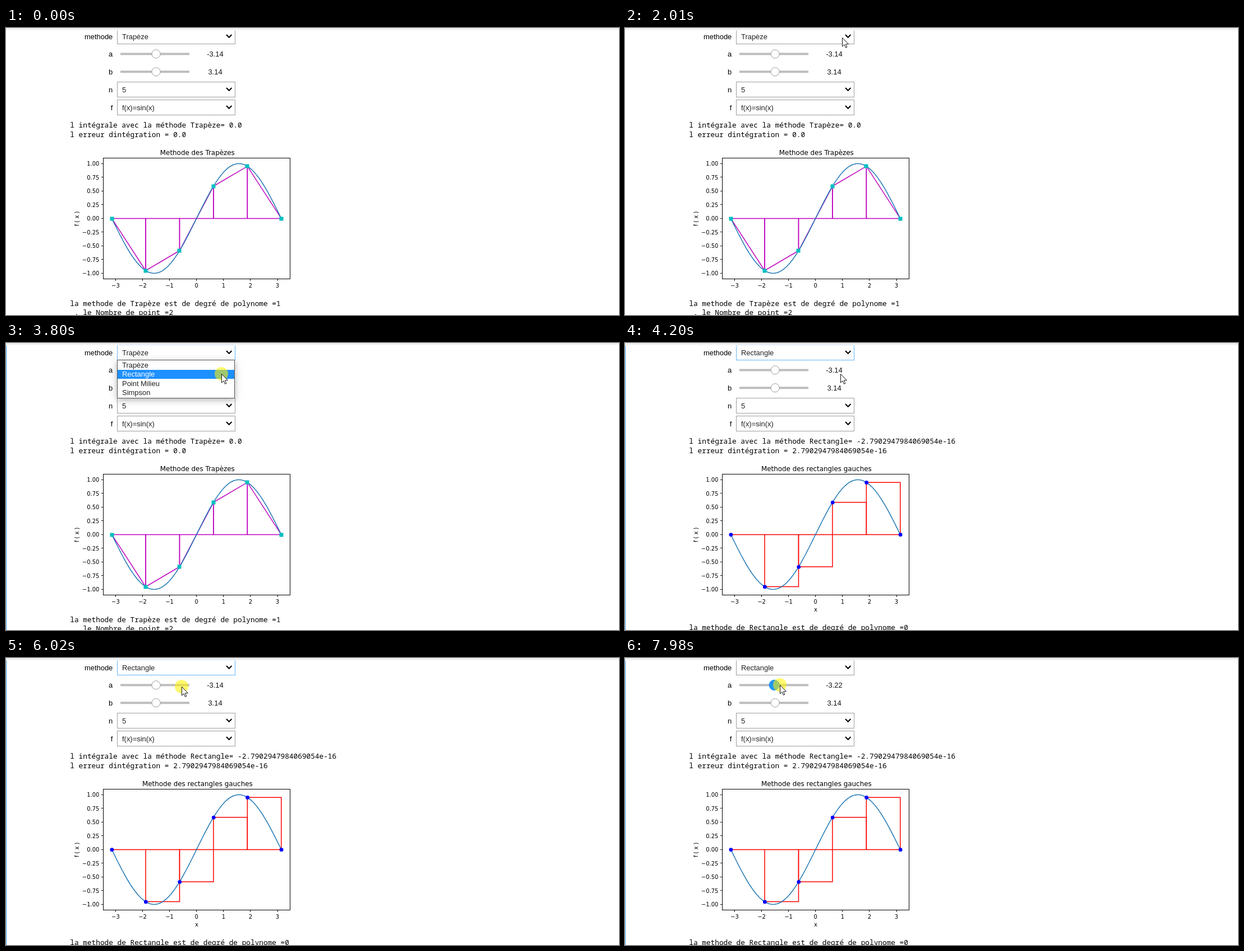
An HTML page with a canvas for the animation above (8 s loop, 1093 by 513 pixels).

```html
<!DOCTYPE html>
<html lang="fr">
<head>
<meta charset="utf-8">
<title>Méthodes d'intégration</title>
<style>
  html, body { margin: 0; width: 100%; height: 100%; overflow: hidden; background: #fff; }
  canvas { display: block; }
</style>
</head>
<body>
<canvas id="stage" width="1093" height="513"></canvas>
<script>
const W = 1093, H = 513, LOOP = 8000;
const ctx = document.getElementById('stage').getContext('2d');

const UI = '12.95px "Liberation Sans", Arial, sans-serif';
const MONO = '12.77px "Noto Sans Mono", monospace';
const PLOT = '9.95px "DejaVu Sans", sans-serif';
const TITLE = '11.92px "DejaVu Sans", sans-serif';
const METHODS = ['Trapèze', 'Rectangle', 'Point Milieu', 'Simpson'];
const NODES = Array.from({ length: 6 }, (_, i) => -Math.PI + i * Math.PI * 2 / 5);

// Pointer path: start, end, steps, target x, target y, vertical bulge
const START = { at: 520, x: 716, y: 396 };
const MOVES = [
  [590, 590, 1, 654, 300, 0],
  [850, 990, 3, 450, 121, 0],
  [1260, 1540, 5, 407, 46, 0],
  [1740, 2010, 5, 387, 17, 0],
  [2750, 3390, 10, 384, 55, 0],
  [4800, 5490, 10, 313, 51, 6],
  [6240, 6580, 5, 310, 50, 0],
  [6920, 7650, 10, 269, 48, -16],
  [7980, 7980, 1, 276, 48, 0]
];
const CLICKS = [[2370, 2480], [3800, 3870], [6020, 6040], [7780, LOOP]];

const within = (t, a, b) => t >= a && t < b;

function pointerAt(t) {
  let { x, y } = START;
  for (const [t0, t1, n, tx, ty, bulge] of MOVES) {
    if (t < t0) break;
    const step = t >= t1 ? n : 1 + Math.floor((t - t0) / (t1 - t0) * (n - 1));
    const p = step / n;
    x += (tx - x) * p;
    y += (ty - y) * p + bulge * Math.sin(Math.PI * p);
    if (p < 1) break;
  }
  return { x: Math.round(x), y: Math.round(y) };
}

function text(str, x, y, font, color = '#000', align = 'left') {
  ctx.font = font;
  ctx.fillStyle = color;
  ctx.textAlign = align;
  ctx.fillText(str, x, y);
}

// Widget text, centred on the row at height y
function rowText(str, x, y, color, align) {
  text(str, x, Math.round(y + 4.6), UI, color, align);
}

function path(points, color, width) {
  ctx.beginPath();
  points.forEach(([x, y]) => ctx.lineTo(x, y));
  ctx.strokeStyle = color;
  ctx.lineWidth = width;
  ctx.stroke();
}

function disc(x, y, r, fill, stroke) {
  ctx.beginPath();
  ctx.arc(x, y, r, 0, Math.PI * 2);
  ctx.fillStyle = fill;
  ctx.fill();
  if (stroke) {
    ctx.strokeStyle = stroke;
    ctx.lineWidth = 1;
    ctx.stroke();
  }
}

function frame(x, y, w, h, color) {
  ctx.strokeStyle = color;
  ctx.lineWidth = 1;
  ctx.strokeRect(x, y, w, h);
}

function label(str, y) {
  rowText(str, 190.3, y, '#000', 'right');
}

function select(name, value, y, border = '#9e9e9e') {
  label(name, y);
  frame(198.5, y - 13.5, 210, 27, border);
  rowText(value, 207, y, '#222');
  path([[393, y - 3], [397.7, y + 1.8], [402.4, y - 3]], '#000', 2);
}

function slider(name, value, y, x, state) {
  label(name, y);
  ctx.fillStyle = '#bdbdbd';
  ctx.fillRect(204, y - 2, 123, 4);
  const blue = '#2196f3';
  if (state === 'active') disc(x, y, 9.2, blue, blue);
  else disc(x, y, 7.6, '#fff', state === 'hover' ? blue : '#9e9e9e');
  rowText(value, 373, y, '#111', 'center');
}

function popup(active) {
  ctx.save();
  ctx.shadowColor = 'rgba(0,0,0,.3)';
  ctx.shadowBlur = 11;
  ctx.shadowOffsetY = 3;
  ctx.fillStyle = '#fff';
  ctx.fillRect(198, 30, 210, 69);
  ctx.restore();
  frame(198.5, 30.5, 209, 68, '#555');
  METHODS.forEach((name, i) => {
    const top = Math.round(31 + i * 16.5), bottom = Math.round(47.5 + i * 16.5);
    if (i === active) {
      ctx.fillStyle = '#1e90ff';
      ctx.fillRect(199, top, 208, bottom - top);
    }
    rowText(name, 207, 39.3 + i * 16.5, i === active ? '#fff' : '#222');
  });
}

function plot(rect, dy) {
  const px = x => 339.7 + x * 48.1;
  const py = y => 340.4 + dy - y * 98;
  const left = 173.5, right = 506.5, top = 232.5 + dy, bottom = 448.5 + dy;
  const ink = rect ? '#f00' : '#bf00bf';

  for (let i = 0; i < 5; i++) {
    const a = NODES[i], b = NODES[i + 1];
    const fa = Math.sin(a), fb = rect ? fa : Math.sin(b);
    path([[a, 0], [a, fa], [b, fb], [b, 0], [a, 0]].map(([x, y]) => [px(x), py(y)]), ink, 1.5);
  }

  const curve = [];
  for (let i = 0; i <= 120; i++) {
    const x = (i / 60 - 1) * Math.PI;
    curve.push([px(x), py(Math.sin(x))]);
  }
  path(curve, '#1f77b4', 1.5);

  for (const x of NODES) {
    const cx = px(x), cy = py(Math.sin(x));
    if (rect) {
      disc(cx + 0.3, cy + 0.3, 3.4, '#00f');
    } else {
      ctx.fillStyle = '#00bfbf';
      ctx.fillRect(Math.round(cx) - 3.5, Math.round(cy + 0.3) - 3.5, 7, 7);
    }
  }

  frame(left, top, right - left, bottom - top, '#000');
  const num = s => s.replace('-', '\u2212');
  for (let k = -4; k <= 4; k++) {
    const y = Math.floor(py(k / 4)) + 0.5;
    path([[left - 3.5, y], [left, y]], '#000', 1);
    text(num((k / 4).toFixed(2)), 166.3, py(k / 4) + 4, PLOT, '#000', 'right');
  }
  for (let k = -3; k <= 3; k++) {
    const x = Math.floor(px(k)) + 0.5;
    path([[x, bottom], [x, bottom + 3.5]], '#000', 1);
    text(num(String(k)), px(k), 464 + dy, PLOT, '#000', 'center');
  }

  text(rect ? 'Methode des rectangles gauches' : 'Methode des Trapèzes',
    341.3, 227 + dy, TITLE, '#000', 'center');
  if (rect) text('x', 340, 478 + dy, PLOT, '#000', 'center');
  ctx.save();
  ctx.translate(129.5, 341 + dy);
  ctx.rotate(-Math.PI / 2);
  text('f ( x )', 0, 0, PLOT, '#000', 'center');
  ctx.restore();
}

function output(rect, dy) {
  const line = (str, y) => text(str, 114.3, y + dy, MONO);
  const name = METHODS[rect ? 1 : 0];
  const error = rect ? '2.7902947984069054e-16' : '0.0';
  line(`l intégrale avec la méthode ${name}= ${rect ? '-' : ''}${error}`, 178);
  line(`l erreur dintégration = ${error}`, 194.5);
  plot(rect, dy);
  const foot = rect ? 511 : 497;
  line(`la methode de ${name} est de degré de polynome =${rect ? 0 : 1}`, foot);
  line(' , le Nombre de point =2', foot + 16.4);
}

function arrow({ x, y }) {
  ctx.save();
  ctx.translate(x + 0.5, y + 0.5);
  ctx.beginPath();
  [[0, 0], [0, 15.5], [3.6, 12.2], [6, 17.8], [8.3, 16.8], [6, 11.4], [10.8, 11.2]]
    .forEach(([a, b]) => ctx.lineTo(a, b));
  ctx.closePath();
  ctx.fillStyle = '#fff';
  ctx.fill();
  ctx.strokeStyle = '#111';
  ctx.lineWidth = 1;
  ctx.stroke();
  ctx.restore();
}

function header() {
  ctx.fillStyle = '#eee';
  ctx.fillRect(0, 0, W, 2);
  const g = ctx.createLinearGradient(0, 2, 0, 6);
  g.addColorStop(0, 'rgba(238,238,238,1)');
  g.addColorStop(0.3, 'rgba(245,245,245,.9)');
  g.addColorStop(1, 'rgba(255,255,255,0)');
  ctx.fillStyle = g;
  ctx.fillRect(0, 2, W, 4);
}

function draw(t) {
  ctx.fillStyle = '#fff';
  ctx.fillRect(0, 0, W, H);

  const selected = t >= 2630;
  const dy = selected ? 2 : 0;
  const focus = within(t, 2630, 6240);
  const pointer = pointerAt(t);
  const dragged = t >= 7980;
  const knob = dragged ? 266.3 : 267.6;
  const over = Math.hypot(pointer.x - knob, pointer.y - 48) < 8.5;
  const state = t >= 7780 ? 'active' : over && t > 6920 ? 'hover' : '';

  select('methode', METHODS[t >= 4000 ? 1 : 0], 15 + dy, focus ? '#64b5f6' : undefined);
  slider('a', dragged ? '-3.22' : '-3.14', 46.4 + dy, knob, state);
  slider('b', '3.14', 78.2 + dy, 267.6, '');
  select('n', '5', 110 + dy);
  select('f', 'f(x)=sin(x)', 142 + dy);
  output(t >= 4200, dy);

  if (selected) {
    ctx.fillStyle = '#42a5f5';
    ctx.fillRect(0, 3, 1, H);
  }
  header();

  if (within(t, 2425, 4000)) popup(pointer.y >= 47 ? 1 : 0);
  if (CLICKS.some(([a, b]) => within(t, a, b))) {
    disc(pointer.x, pointer.y, 12, 'rgba(255,243,0,.57)');
  }
  if (t >= START.at) arrow(pointer);
}

const begin = performance.now();
function tick() {
  draw((performance.now() - begin) % LOOP);
  requestAnimationFrame(tick);
}
tick();
</script>
</body>
</html>
```
